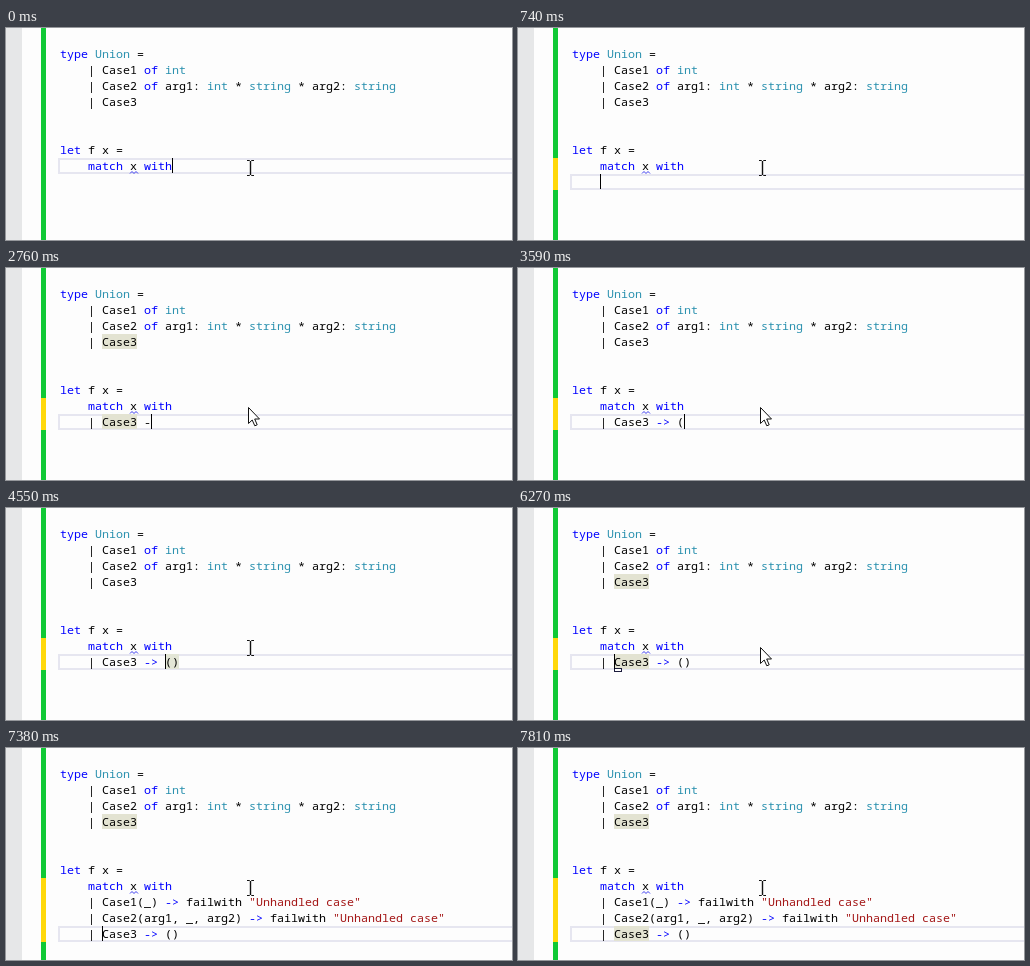
These frames come from a looping animation (506 by 212 pixels, 8000 ms). An HTML page with a canvas:

```html
<!DOCTYPE html>
<html lang="en">
<head>
<meta charset="utf-8">
<title>Pattern match completion</title>
<style>
  html, body { margin: 0; width: 100%; height: 100%; overflow: hidden; background: #fdfdfd; }
  canvas { display: block; }
</style>
</head>
<body>
<canvas id="stage" width="506" height="212"></canvas>
<script>
const ctx = document.getElementById('stage').getContext('2d');
const LOOP = 8000, LEFT = 54, TOP = 18, CHAR = 7, ROW = 16;
const colX = col => LEFT + col * CHAR;
const rowY = row => TOP + row * ROW;

const header = [
  'type Union =',
  '    | Case1 of int',
  '    | Case2 of arg1: int * string * arg2: string',
  '    | Case3',
  '', '',
  'let f x =',
  '    match x with'
];
const generated = [
  '    | Case1(_) -> failwith "Unhandled case"',
  '    | Case2(arg1, _, arg2) -> failwith "Unhandled case"',
  '    | Case3 -> ()'
];
const typed = text => ['    ' + text];

// Each step changes only the listed parts of the state; col is the caret column.
const steps = [
  [0, { lines: [], row: 7, col: 16, caret: true, arrow: false }],
  [430, { caret: false }],
  [740, { lines: typed(''), row: 8, col: 4, caret: true }],
  [870, { lines: typed('|'), col: 5 }],
  [1130, { lines: typed('| '), col: 6 }],
  [1410, { lines: typed('| C'), col: 7 }],
  [1560, { lines: typed('| Ca'), col: 8 }],
  [1810, { lines: typed('| Case'), col: 10, arrow: true }],
  [2210, { lines: typed('| Case3'), col: 11 }],
  [2490, { refs: true }],
  [2620, { lines: typed('| Case3 '), col: 12 }],
  [2760, { lines: typed('| Case3 -'), col: 13 }],
  [3040, { lines: typed('| Case3 ->'), col: 14 }],
  [3190, { lines: typed('| Case3 -> '), col: 15, refs: false }],
  [3590, { lines: typed('| Case3 -> ('), col: 16 }],
  [3730, { lines: typed('| Case3 -> ()'), col: 17 }],
  [3860, { braces: true }],
  [4140, { caret: false, arrow: false }],
  [4550, { caret: true, col: 15 }],
  [4700, { col: 12 }],
  [4850, { braces: false }],
  [5160, { col: 6 }],
  [5310, { refs: true, tag: true }],
  [5720, { caret: false, arrow: true }],
  [6270, { caret: true }],
  [6390, { caret: false, tag: false, button: true, arrow: false }],
  [6540, { menu: true }],
  [7380, { lines: generated, row: 10, caret: true, button: false, menu: false, lateRef: true }],
  [7530, { lateRef: false }],
  [7810, { caret: false }]
];

const stateAt = time => Object.assign({}, ...steps.filter(s => s[0] <= time).map(s => s[1]));

function box(x, y, w, h, fill, stroke) {
  ctx.fillStyle = fill;
  ctx.fillRect(x, y, w, h);
  if (!stroke) return;
  ctx.lineWidth = 1;
  ctx.strokeStyle = stroke;
  ctx.strokeRect(x + .5, y + .5, w - 1, h - 1);
}

function path(points, fill, stroke, width = 1) {
  ctx.beginPath();
  points.forEach(([x, y]) => ctx.lineTo(x, y));
  if (fill) {
    ctx.closePath();
    ctx.fillStyle = fill;
    ctx.fill();
  }
  if (stroke) {
    ctx.strokeStyle = stroke;
    ctx.lineWidth = width;
    ctx.stroke();
  }
}

function colorOf(token) {
  if (token[0] === '"') return '#a31515';
  if (/^(type|of|let|match|with|->)$/.test(token)) return '#0000ff';
  if (/^(Union|int|string)$/.test(token)) return '#2b91af';
  return '#000';
}

function code(text, row) {
  ctx.font = '11.667px "Noto Sans Mono", "DejaVu Sans Mono", monospace';
  for (const match of text.matchAll(/"[^"]*"|->|\w+|\S/g)) {
    ctx.fillStyle = colorOf(match[0]);
    [...match[0]].forEach((c, i) => ctx.fillText(c, colX(match.index + i), rowY(row) + 12));
  }
}

function drawButton() {
  box(96, 162, 33, 21, '#e9eefa', '#b4bfd6');
  path([[104.5, 172], [104.5, 166.5], [110.5, 166.5], [113.5, 169.5], [113.5, 177.5], [109, 177.5]],
    null, '#424242', 1.4);
  path([[110, 167], [110, 170], [113, 170]], null, '#424242');
  path([[101.5, 173], [101.5, 176.5], [106, 176.5]], null, '#424242', 1.6);
  path([[105, 173.5], [109, 176.5], [105, 179.5]], '#424242');
  path([[118, 171], [124, 171], [121, 174]], '#1e1e1e');
}

function drawMenu() {
  box(96, 182, 284, 28, '#e9eefa', '#b4bfd6');
  box(98, 184, 281, 25, '#fdf4bf', '#e5c365');
  ctx.fillStyle = '#1e1e1e';
  ctx.font = '11.2px "Open Sans", "Noto Sans", sans-serif';
  ctx.fillText('Generate union pattern match cases', 133, 201);
}

function drawPointer(arrow) {
  if (arrow) {
    path([[242.5, 139.5], [242.5, 155.5], [246.2, 152], [248.8, 157.8], [251.2, 156.8],
      [248.7, 151], [253.5, 151]], '#fff', '#111');
  } else {
    path([[241, 132.5], [243.5, 132.5], [244.5, 133.5], [245.5, 132.5], [248, 132.5]], null, '#111');
    path([[244.5, 133], [244.5, 147]], null, '#111', 1.4);
    path([[241, 147.5], [243.5, 147.5], [244.5, 146.5], [245.5, 147.5], [248, 147.5]], null, '#111');
  }
}

function draw(s) {
  const last = 7 + s.lines.length;
  box(0, 0, 506, 212, '#fdfdfd');
  box(0, 0, 16, 212, '#e6e7e8');
  box(35, 0, 5, 212, '#10c935');
  if (s.lines.length) box(35, rowY(7), 5, (s.lines.length + 1) * ROW, '#ffd80a');

  ctx.strokeStyle = '#e6e6f0';
  ctx.lineWidth = 2;
  ctx.strokeRect(53, rowY(s.row) + 1, 470, 14);

  if (s.refs) {
    box(colX(6), rowY(3), 35, 15, '#e3e3d2');
    if (!s.lateRef) box(colX(6), rowY(last), 35, 15, '#e3e3d2');
  }
  if (s.braces) box(colX(15), rowY(8), 14, 15, '#e3e6d6');

  header.forEach(code);
  s.lines.forEach((text, i) => code(text, 8 + i));
  path([[124, 145.5], [126, 143.5], [128, 145.5], [130, 143.5], [132, 145.5]], null, '#3a3af0');

  if (s.tag) box(96, 160, 8, 4, '#fff', '#1c1c3c');
  if (s.caret) box(colX(s.col), rowY(s.row), 1, 15, '#000');
  if (s.button) drawButton();
  if (s.menu) drawMenu();
  drawPointer(s.arrow);
}

const start = performance.now();
function tick() {
  draw(stateAt((performance.now() - start) % LOOP));
  requestAnimationFrame(tick);
}
tick();
</script>
</body>
</html>
```
